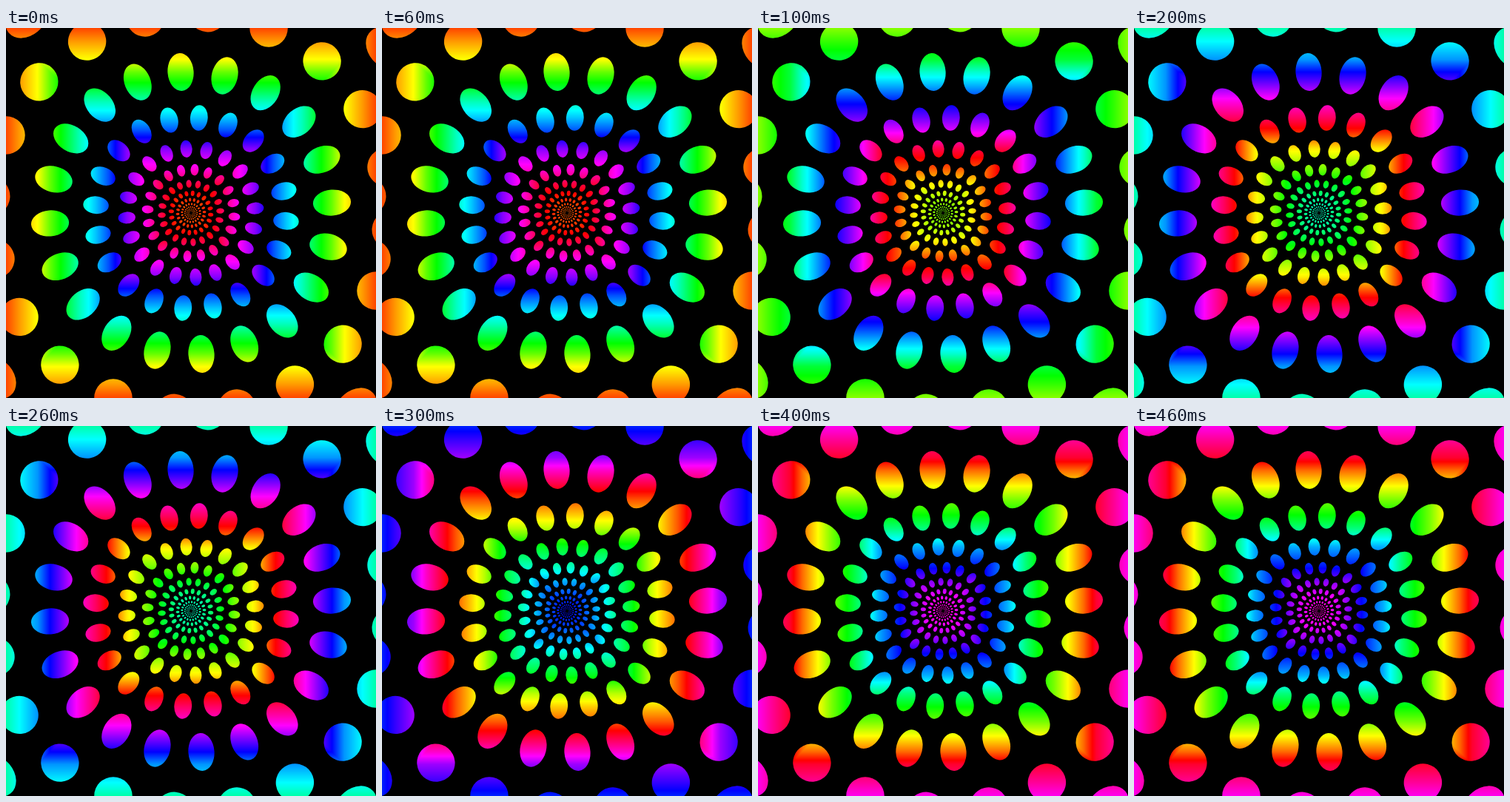
These frames come from a looping animation (500 by 500 pixels, 500 ms). An HTML page with a canvas:

```html
<!DOCTYPE html>
<html lang="en">
<head>
<meta charset="utf-8">
<title>Rainbow dot tunnel</title>
<style>
html, body { margin: 0; width: 100%; height: 100%; overflow: hidden; background: #000; }
canvas { display: block; }
</style>
</head>
<body>
<canvas id="stage" width="500" height="500"></canvas>
<script>
const ctx = document.getElementById('stage').getContext('2d');
const MID = 250, STEP = 100, STEPS = 5;
const PER_RING = 20, PITCH = 2 * Math.PI / PER_RING;
const TILT = -4.2 * Math.PI / 180;

// Hue along the square distance from the centre: [distance, degrees]
const HUES = [[0, 384], [10, 378], [24, 364], [39, 345], [60, 308], [87, 271],
  [112, 220], [129, 193], [150, 164], [170, 130], [190, 97], [207, 61], [232, 36], [250, 16]];

function hueAt(d) {
  const i = Math.max(1, HUES.findIndex(p => p[0] >= d));
  const [d0, h0] = HUES[i - 1], [d1, h1] = HUES[i];
  return h0 + (h1 - h0) * (d - d0) / (d1 - d0);
}

// A black sheet with rings of oval holes; alternate rings shift by half a pitch
const sheet = new Path2D();
sheet.rect(0, 0, 2 * MID, 2 * MID);

function addRing(r, across, along, shifted) {
  for (let i = 0; i < PER_RING; i++) {
    const a = TILT + (i + (shifted ? 0.5 : 0)) * PITCH;
    const x = MID + r * Math.cos(a), y = MID + r * Math.sin(a);
    sheet.moveTo(x + along * Math.cos(a), y + along * Math.sin(a));
    sheet.ellipse(x, y, along, across, a, 0, 2 * Math.PI);
  }
}

addRing(345, 31, 24, false);
addRing(271, 25.8, 25.5, true);
for (let k = 0, r = 191; r > 2; k++, r /= 1.482) {
  addRing(r, r * 0.092, r * 0.134, k % 2 === 1);
}

function draw(step) {
  for (let d = MID; d > 0; d--) {
    ctx.fillStyle = `hsl(${(hueAt(d - 0.5) + step * 360 / STEPS) % 360}, 100%, 50%)`;
    ctx.fillRect(MID - d, MID - d, 2 * d, 2 * d);
  }
  ctx.fillStyle = '#000';
  ctx.fill(sheet, 'evenodd');
}

let shown = 0;
const start = performance.now();
function tick() {
  const step = Math.floor((performance.now() - start) / STEP) % STEPS;
  if (step !== shown) draw(shown = step);
  requestAnimationFrame(tick);
}
draw(0);
requestAnimationFrame(tick);
</script>
</body>
</html>
```
